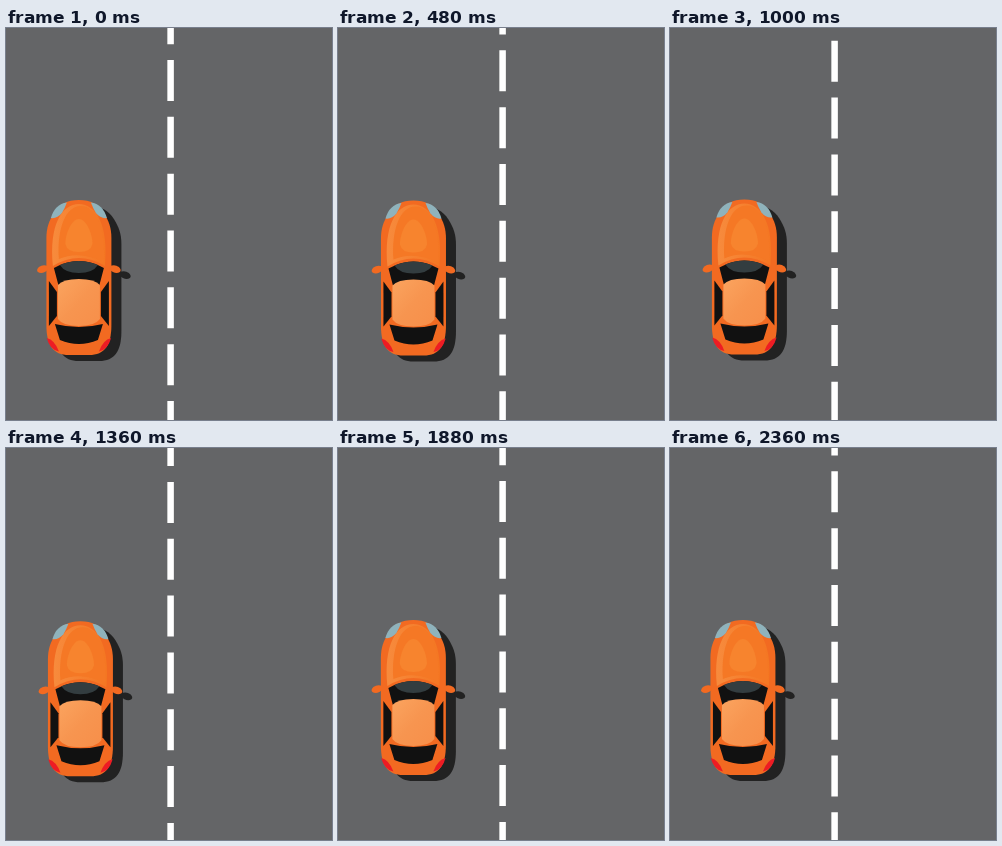
Recreate the animation shown at these times as an HTML page. Size 326x392 px, loop 2.4 s.

```html
<!DOCTYPE html>
<html>
<head>
<meta charset="utf-8">
<title>Car on the road</title>
<style>
  html, body { margin: 0; width: 100%; height: 100%; overflow: hidden; background: #646567; }
  svg { display: block; }
</style>
</head>
<body>
<svg width="326" height="392" viewBox="0 0 326 392">
  <defs>
    <linearGradient id="shine">
      <stop offset="0" stop-color="#f78b3d"/>
      <stop offset="1" stop-color="#f47622"/>
    </linearGradient>
    <linearGradient id="roof" x2="1" y2="1">
      <stop offset="0" stop-color="#fba45f"/>
      <stop offset=".5" stop-color="#f79550"/>
      <stop offset="1" stop-color="#f78f4a"/>
    </linearGradient>
    <g id="shell">
      <path d="M0 0C12 0 19 4 25 13C30 21 32.5 28 32.5 38V125C32.5 145 26 155 10 155H-10C-26 155-32.5 145-32.5 125V38C-32.5 28-30 21-25 13C-19 4-12 0 0 0Z"/>
      <path id="mirror" d="M31 66Q36 64 40 67Q43 70 41 72Q38 74 34 72L31 70Z"/>
      <use href="#mirror" transform="scale(-1 1)"/>
    </g>
    <g id="side">
      <path d="M12 2.5Q24 4 28 18Q22 19 17 13Q14 8 12 2.5Z" fill="#8fb3bc"/>
      <path d="M30 81V126L22 116V92Z" fill="#111"/>
      <path d="M32.2 138Q24 140 20 151.5Q29 150 32.2 138Z" fill="#ed1c24"/>
    </g>
  </defs>

  <path id="lane" d="M164.6-57V450" stroke="#fff" stroke-width="6.5" stroke-dasharray="41 15.83"/>

  <g id="car">
    <use href="#shell" x="10" y="6" fill="#222"/>
    <use href="#shell" fill="#f26a21"/>
    <path d="M-26 66C-30 25-17 4 0 4S30 25 26 66Q0 50-26 66Z" fill="url(#shine)"/>
    <path d="M-20 59C-22 30-14 6 2 6S27 30 25 62Q0 50-20 59Z" fill="#f57825"/>
    <path d="M0 19C8 19 14 36 13.5 44Q12 52 0 52T-13.5 44C-14 36-8 19 0 19Z" fill="#f7842e"/>
    <path d="M-25 68Q0 54 25 68L20 87Q0 73-20 87Z" fill="#111"/>
    <path d="M-19 65Q0 57 19 65Q14 73 0 73T-19 65Z" fill="#333d40"/>
    <path d="M-24 124Q0 130 24 124L19 140Q0 148-19 140Z" fill="#111"/>
    <path d="M-21 85Q-16 79 0 79T21 85V119Q16 126 0 126T-21 119Z" fill="url(#roof)"/>
    <use href="#side"/>
    <use href="#side" transform="scale(-1 1)"/>
  </g>
</svg>
<script>
  const LOOP = 2400, STEP = 40, PERIOD = 56.83, HOLD = 12;
  const SPEED = 9 * PERIOD / (LOOP / STEP - 1);
  const sway = [[0, 72.9], [560, 75.6], [1180, 74.1], [1760, 75.6], [LOOP, 72.9]];
  const bob = [[0, 172], [320, 173.1], [840, 170.9], [1360, 173.2], [1900, 172], [LOOP, 172]];
  const lane = document.getElementById('lane');
  const car = document.getElementById('car');

  // Cosine easing between neighbouring [time, value] keys.
  function ease(keys, t) {
    const i = keys.findIndex(([time]) => time > t);
    const [t0, a] = keys[i - 1], [t1, b] = keys[i];
    return a + (b - a) * (1 - Math.cos(Math.PI * (t - t0) / (t1 - t0))) / 2;
  }

  function draw() {
    const step = Math.floor((performance.now() % LOOP) / STEP);
    const t = step * STEP;
    // The road rests for a single step in each loop.
    const travel = 32 + SPEED * (step - (step > HOLD));
    lane.setAttribute('stroke-dashoffset', -57 - travel % PERIOD);
    car.setAttribute('transform', `translate(${ease(sway, t)} ${ease(bob, t)})`);
    requestAnimationFrame(draw);
  }
  draw();
</script>
</body>
</html>
```
